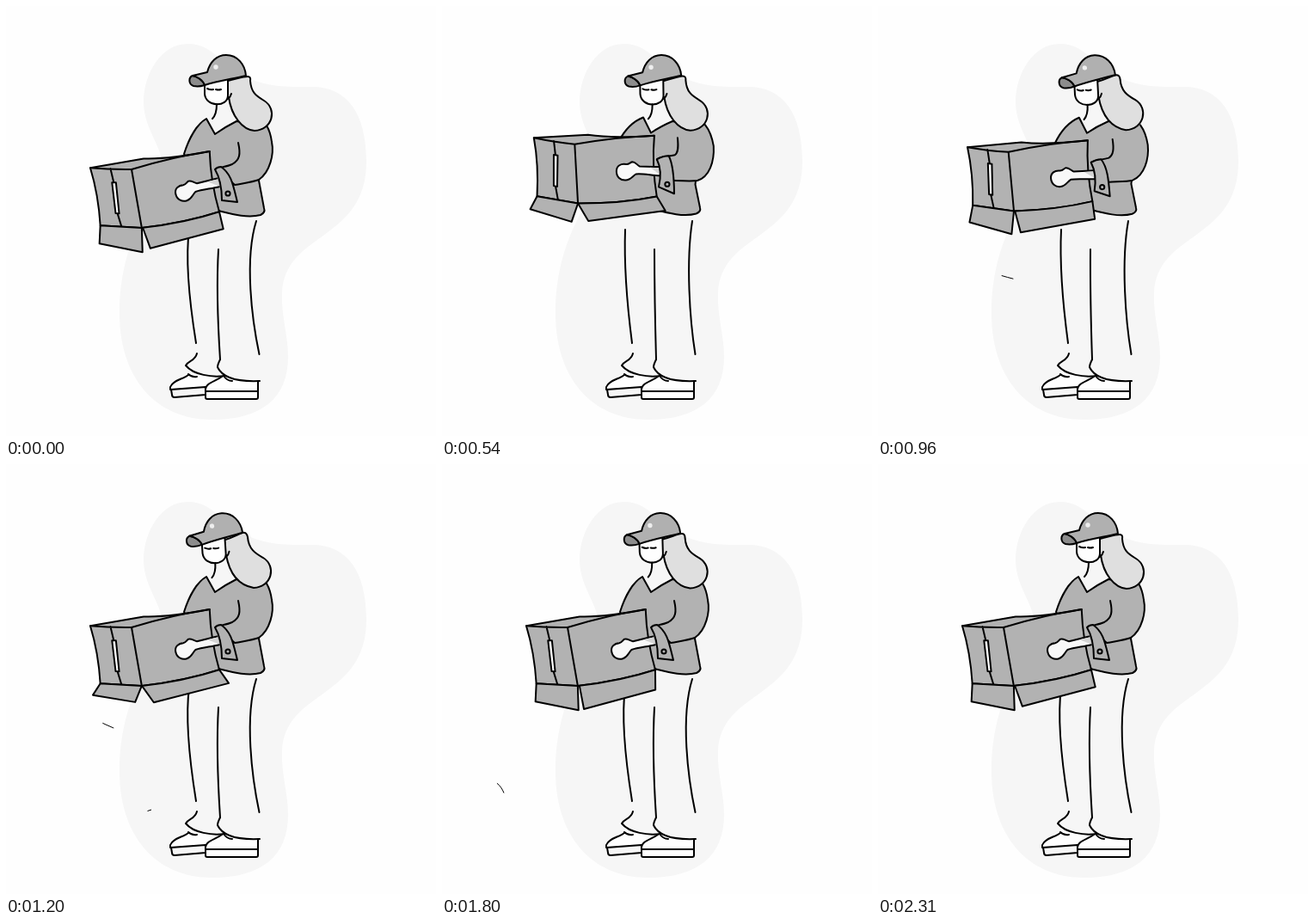
Animation of 500 by 500 pixels, one loop 2.34 s. Source, as an HTML page with a canvas:

```html
<!DOCTYPE html>
<html lang="en">
<head>
<meta charset="utf-8">
<title>Carrying a box</title>
<style>
  html, body { margin: 0; width: 100%; height: 100%; overflow: hidden; background: #fefefe; }
  canvas { display: block; width: 500px; height: 500px; }
</style>
</head>
<body>
<canvas id="stage" width="500" height="500"></canvas>
<script>
const ctx = document.getElementById('stage').getContext('2d');
const LOOP = 2340, GREY = '#b2b2b2', WHITE = '#fefefe';

// Keyframes as [time, value], eased between neighbours.
const LIFT = [[0, 0], [420, .88], [620, .58], [800, 1], [1110, 0]];
const STRETCH = [[300, 0], [780, 1], [1110, 0]];
const NOD = [[250, 0], [1250, 1], [2300, 0]];
const LEFT_FLAP = [[330, 0], [540, .65], [780, 0], [900, 0], [1150, 1], [1300, .9], [1600, 0]];
const RIGHT_FLAP = [[0, .4], [330, .65], [540, 1], [780, .4], [900, .3], [1180, .95], [1250, .9], [1750, 0], [2200, .4]];

// Poses: box low, halfway, high.
const ARM = [
  'M270 159C273 172 272 179 263 184C257 187 250 187 245 189L266 208C276 206 286 205 294 202C307 193 312 172 309 158C308 150 306 144 303 139',
  'M274 153C275 163 275 170 271 173C262 175 254 175 250 178L270 203C280 203 290 204 297 203C311 199 317 181 316 163C314 151 310 143 306 138',
  'M274 157C274 166 276 172 279 180C271 176 262 175 256 178L270 207C278 209 288 213 296 212C309 208 314 192 313 174C312 158 308 147 302 141'];
const CUFF = [
  'M243 190Q246 187 250 187C262 195 264 208 269 228L251 226C251 210 249 200 243 190Z',
  'M250 178Q257 174 264 174C269 184 270 198 270 218L252 210C255 198 254 186 250 178Z',
  'M256 178Q263 175 270 178C275 192 271 207 266 222L252 211C258 200 259 188 256 178Z'];
const BOX_AT = [[146, 190], [154.5, 160], [161, 148]];
const HAND_AT = [[208, 216, -14], [214, 191.5, 2], [217, 184, 13]];
const BUTTON_AT = [[258, 218], [262, 207], [262, 209]];

const lerp = (a, b, k) => a + (b - a) * k;

function track(keys, t) {
  if (t <= keys[0][0]) return keys[0][1];
  for (let i = 1; i < keys.length; i++) {
    const [t0, a] = keys[i - 1], [t1, b] = keys[i];
    if (t < t1) {
      const k = (t - t0) / (t1 - t0);
      return lerp(a, b, k * k * (3 - 2 * k));
    }
  }
  return keys[keys.length - 1][1];
}

// Blends two matching path strings or number lists.
function mix(a, b, k) {
  if (Array.isArray(a)) return a.map((v, i) => lerp(v, b[i], k));
  const target = b.match(/-?[\d.]+/g);
  let i = 0;
  return a.replace(/-?[\d.]+/g, n => lerp(+n, +target[i++], k).toFixed(2));
}

const pose = ([low, mid, high], p) => p < .7 ? mix(low, mid, p / .7) : mix(mid, high, (p - .7) / .3);

function draw(path, fill, outline = true) {
  const shape = new Path2D(path);
  if (fill) { ctx.fillStyle = fill; ctx.fill(shape); }
  if (outline) ctx.stroke(shape);
}

function dot(x, y, r, fill, outline) {
  ctx.beginPath();
  ctx.arc(x, y, r, 0, 7);
  if (fill) { ctx.fillStyle = fill; ctx.fill(); }
  if (outline) ctx.stroke();
}

function within(x, y, degrees, paint) {
  ctx.save();
  ctx.translate(x, y);
  ctx.rotate(degrees * Math.PI / 180);
  paint();
  ctx.restore();
}

function backdrop() {
  draw('M211 44C181 44 160 78 160 112C160 146 188 169 181 196C172 232 132 270 132 358C132 430 172 481 240 481C297 481 328 456 328 408C328 382 320 362 321 334C324 262 419 274 419 181C419 125 397 94 356 94C328 94 311 95 284 85C252 74 244 44 211 44Z', '#f6f6f6', false);
}

function legs(k) {
  draw(mix('M213 260Q207 305 221 392M247 283Q244 335 249 411M291 250C277 295 286 365 294.500 405',
           'M213 260Q215 325 221 392M247 283Q250 345 249 411M291 250C290 300 290 365 294.500 405', k));
  draw('M212 429C206 434 194 435 191 443V446L232 443L240 431Q224 432 212 425Z', WHITE, false);
  draw('M212 429C206 434 194 435 191 443V446L232 443M192 446L232 443V452L196 455Q193 455 193 452ZM212 428Q216 432 222 431');
  draw('M232 448C231 440 241 437 248 432L256 430L294 436V448Z', WHITE, false);
  draw('M251 431C243 437 231 438 232 448H293V436M253 430Q257 436 263 436');
  draw('M232 448H293V455Q293 457 291 457H234Q232 457 232 455Z', WHITE);
  draw('M222 404C220 413 212 412 209 418C218 429 240 432 254 430M249 411C247 415 246 417 246 420C252 433 272 437 295 436');
}

function torso(k) {
  draw(mix('M207 172C212 156 221 138 233 131L243 149Q254 141 268 134L303 139L294 203L300 235Q302 240 296 243C281 247 263 242 247 238L225 200Z',
           'M204 143C212 134 224 130 235 128L243 146Q254 139 268 134L302 141L295 212L300 234Q301 238 295 240C282 244 264 240 247 235L225 200Z', k), GREY);
}

function head(k) {
  draw(mix('M258 87C268 85 275 82 281 82Q285 82 284 87C285 100 290 104 300 110C316 120 310 144 289 145C275 144 262 128 259 106',
           'M255 88C265 85 271 81 275 80Q280 79 281 85C282 99 290 104 299 109C315 119 309 143 288 144C271 141 260 128 256 106', k), '#dfdfdf');
  within(258, 140, -3.8 * k, () => {
    ctx.translate(-258, -140);
    draw('M231 90V102C232 118 258 118 258 104V86', WHITE);
    draw('M258 108Q261 106 262 102M245 114C245 122 244 127 240 131M234 96Q238 98 241 97M244 97Q247 98 250 97');
    draw('M217 81C212 83 212 91 218 93C223 94 228 93 231 92C229 86 223 82 217 81Z', '#8c8c8c');
    draw('M217 81L234 77C237 65 245 57 256 57C269 57 278 68 279 81C262 85 247 87 231 92C229 86 222 82 217 81Z', '#b0b0b0');
    dot(244, 71, 2.7, '#eee');
  });
}

function box(p, left, right) {
  const [x, y] = pose(BOX_AT, p);
  within(x, y, -9.9 * (1 - p), () => {
    draw('M-47 -10L16 -10Q45 -4 93 -5Q88 30 92 66Q50 72 0 69L-47 58Q-43 22 -47 -10Z', GREY);
    draw('M-47 -10Q-25 -4 0 0L0 69M0 0Q50 -6 93 -5M-24 -5L-23 12M-25 47L-23 63');
    draw('M-25 11L-20.5 12L-23 48L-27 47Z', WHITE);
    draw(mix('M-47 58L-51.6 78.500L-4 97L0 69Z', 'M-47 58L-58 69.500L-11 86L0 69Z', left), GREY);
    draw(mix('M2 69L2.300 97L88 89L92 66Q50 72 2 69Z', 'M0 69L11 90L101 83L92 66Q50 72 0 69Z', right), GREY);
  });
}

function arm(p) {
  draw(pose(ARM, p), GREY);
  within(...pose(HAND_AT, p), () => {
    draw('M40 -6L16 -6C12 -8 11 -11 7 -11C4 -10 4 -8 0 -8C-6 -9 -11 -6 -11 0C-11 7 -6 11 0 10.500C6 10 8 5 12 3C20 2 30 4 40 4', '#f8f8f8');
    draw('M28 -5L40 -5L40 3Z', '#d4d4d4', false);
  });
  draw(pose(CUFF, p), GREY);
  dot(...pose(BUTTON_AT, p), 2.6, null, true);
}

// A short dash that travels along a path at a steady speed (px per ms).
function gust(path, start, end, speed, t) {
  if (t < start || t > end) return;
  ctx.save();
  ctx.lineWidth = 1;
  ctx.lineCap = 'butt';
  ctx.setLineDash([14, 9999]);
  ctx.lineDashOffset = 14 - (t - start) * speed;
  draw(path);
  ctx.restore();
}

function frame(now) {
  const t = now % LOOP;
  const lift = track(LIFT, t), stretch = track(STRETCH, t);
  ctx.clearRect(0, 0, 500, 500);
  ctx.strokeStyle = '#000';
  ctx.lineWidth = 2;
  ctx.lineCap = ctx.lineJoin = 'round';
  backdrop();
  legs(stretch);
  torso(stretch);
  box(lift, track(LEFT_FLAP, t), track(RIGHT_FLAP, t));
  arm(lift);
  head(track(NOD, t));
  gust('M174 321C155 317 135 312 116 303C95 293 75 285 61 290', 738, 1640, .14, t);
  gust('M169 402C140 413 76 412 74 391C71 365 45 360 33 372', 1176, 2170, .2, t);
  requestAnimationFrame(frame);
}
requestAnimationFrame(frame);
</script>
</body>
</html>
```
